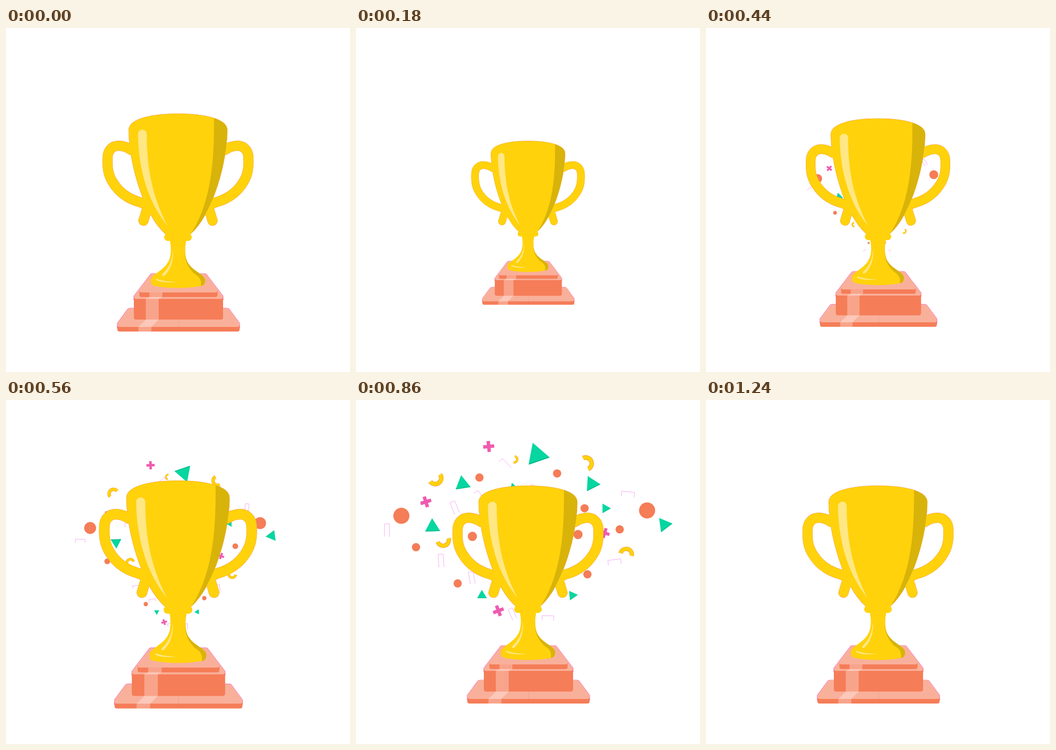
An HTML page for the animation above (1500 ms loop, 748x748 px).

```html
<!DOCTYPE html>
<html lang="en">
<head>
<meta charset="utf-8">
<title>Trophy</title>
<style>
  html, body { margin: 0; width: 100%; height: 100%; overflow: hidden; background: #fff; }
  svg { display: block; width: 100vw; height: 100vh; }
  .gold { fill: #ffd20c; }
  .shade { fill: #d8b30a; }
  .glow { fill: #ffe785; }
  .top { fill: #f9b09a; stroke: #ff4fd0; stroke-width: 1.2; paint-order: stroke; }
  .front { fill: #f57d58; }
  .rim { fill: #f5893f; stroke: #f5893f; stroke-width: 1.1; }
  .handle { fill: none; stroke: #ffd20c; stroke-width: 21; stroke-linecap: round; }
  .edge { stroke: #f5893f; stroke-width: 22; }
  .slip { fill: none; stroke: #f08cf4; stroke-width: .8; }
</style>
</head>
<body>
<svg viewBox="0 0 748 748">
  <defs>
    <path id="cup" d="M267 222C267 196 322 186.500 374 186.500S481 196 481 222C481 290 450 404 401 448H347C298 404 267 290 267 222Z"/>
    <path id="stem" d="M356 460H392C388 480 388 502 398 514C409 530 433 536 433 549C433 553 432 557 428 560C400 567 348 567 320 560C315 557 315 553 315 549C315 537 337 530 349 514C360 500 360 480 356 460Z"/>
    <rect id="collar" x="344" y="447" width="60" height="16" rx="8"/>
    <path id="arm" d="M272 265C260 257 251 256 244 256C231 256 221 267 221 281C220 300 221 318 232 335C247 360 270 373 292 379C307 384 309 391 304 402L299 419"/>
    <clipPath id="inCup"><use href="#cup"/></clipPath>
    <clipPath id="inStem"><use href="#stem"/></clipPath>
  </defs>
  <g id="confetti"></g>
  <g id="trophy">
    <path class="top" d="M271 609H479Q484 609 486 612L508 642V652H242V642L264 612Q266 609 271 609Z"/>
    <path class="front" d="M242 645q0 5 5 5H503q5 0 5-5V655q0 5-5 5H247q-5 0-5-5Z"/>
    <path class="top" d="M318 534H432Q435 534 437 537L472 583V591H278V583L313 537Q315 534 318 534Z"/>
    <path class="front" d="M290 570q0 5 5 5H455q5 0 5-5V580q0 5-5 5H295q-5 0-5-5Z"/>
    <path class="front" d="M278 584q0 5 5 5H467q5 0 5-5V629q0 5-5 5H283q-5 0-5-5Z"/>
    <path d="M375.5 634V660" stroke="#e8704c" stroke-width=".6" opacity=".5"/>
    <path fill="#fff" opacity=".3" d="M312 575H340V585L332 589V634L316 650V660H288V650L304 634V589L312 585Z"/>

    <use href="#cup" class="rim"/>
    <use href="#arm" class="handle edge"/>
    <use href="#arm" class="handle edge" transform="matrix(-1 0 0 1 748 0)"/>
    <use href="#arm" class="handle"/>
    <use href="#arm" class="handle" transform="matrix(-1 0 0 1 748 0)"/>

    <use href="#stem" class="gold"/>
    <path class="shade" clip-path="url(#inStem)" d="M391 463C386 500 391 515 408 533C420 541 427 547 423 564H440V463Z"/>
    <path class="glow" d="M363 483C365 505 358 525 346 537C342 541 338 539 340 535C352 524 361 510 363 483Z"/>
    <path class="glow" d="M326 545C340 550 355 552 372 552C350 555 330 552 326 547Z"/>
    <use href="#collar" class="gold"/>
    <use href="#cup" class="gold"/>
    <path class="shade" clip-path="url(#inCup)" d="M452 180V190C454 300 443 385 401 449H490V180Z"/>
    <path class="glow" d="M287 231a9.500 9.500 0 0 1 19-1C306 310 320 370 351 430C310 380 288 310 287 231Z"/>
  </g>
</svg>
<script>
const LOOP = 1500, BURST = 250, LIFE = 830, SPREAD = 860;
const ORIGIN = { x: 372, y: 530 };
const layer = document.getElementById('confetti');
const trophy = document.getElementById('trophy');

const halfRing = (color, width) =>
  `<path d="M0-.75A.75 .75 0 0 1 0 .75" fill="none" stroke="${color}" stroke-width="${width}"/>`;

// A piece is turned by tilt + turn * direction, and spins in degrees per ms.
const kinds = {
  slip: { tilt: 40, turn: -1, spin: .3 },
  disc: { tilt: 0, turn: 0, spin: 0, art: '<circle r="1" fill="#f57d58"/>' },
  wedge: { tilt: 12, turn: -.4, spin: .6,
    art: '<path d="M1 0L-.5 .866V-.866Z" fill="#06d6a0"/><path d="M.95 0L-.46 .8" stroke="#08b98c" stroke-width=".08"/>' },
  cross: { tilt: 0, turn: .5, spin: .29,
    art: '<path d="M-1 0H1M0-1V1" stroke="#ef5bb0" stroke-width=".62"/>' },
  ring: { tilt: 5, turn: -1.7, spin: .61, art: halfRing('#f0923a', .56) + halfRing('#ffd20c', .46) }
};

const clamp = v => Math.min(1, Math.max(0, v));
const swing = p => (1 - Math.cos(Math.PI * p)) / 2;
const rad = deg => deg * Math.PI / 180;

// Drag slows the sideways flight gently and the climb sharply.
const slow = power => age => 1 - (1 - clamp(age / LIFE)) ** power;
const drift = slow(2.3), climb = slow(5);
const grow = age => drift(age) ** .8;

const pieces = [];

// Throws pieces of one kind to a shared radius, one per direction (0 is up).
function toss(name, size, radius, ...directions) {
  const kind = kinds[name];
  const delay = Math.min(155, Math.max(0, (350 - radius) * 1.6));
  const start = BURST + delay, full = SPREAD - start;
  for (const dir of directions) {
    const el = document.createElementNS('http://www.w3.org/2000/svg', kind.art ? 'g' : 'path');
    if (kind.art) el.innerHTML = kind.art;
    else el.setAttribute('class', name);
    layer.append(el);
    pieces.push({
      el, kind, start,
      angle: kind.tilt + kind.turn * dir,
      dx: radius * Math.sin(rad(dir)) / drift(full),
      dy: -radius * Math.cos(rad(dir)) / climb(full),
      size: size / grow(full)
    });
  }
}

toss('slip', 1, 392, -51, -7, 34);
toss('slip', 1, 335, -28, -18, 3);
toss('slip', 1, 260, -46, 47);
toss('slip', .95, 187, -40);
toss('slip', .9, 72, -26, 39);
toss('disc', 17.5, 390, -44.5, 42);
toss('disc', 9, 376, -16, 10);
toss('disc', 9, 320, -49, 23, 39);
toss('disc', 10, 262, -27, 25);
toss('disc', 9, 200, -49, 41);
toss('wedge', 28, 411, 3);
toss('wedge', 19, 375, -22, 22);
toss('wedge', 18, 395, 49);
toss('wedge', 19, 327, -39);
toss('wedge', 12, 340, -5, 30);
toss('wedge', 12, 144, -43, 43);
toss('cross', 12, 437, -11);
toss('cross', 12, 379, -35.5);
toss('cross', 11, 294, 35);
toss('cross', 12, 95, -41);
toss('ring', 17.5, 412, -29, 18);
toss('ring', 9, 402, -4);
toss('ring', 16.5, 290, -39, 48);

// Sides of a paper slip that face up or sideways
function slipPath(x, y, s, deg) {
  const c = Math.cos(rad(deg)), n = Math.sin(rad(deg));
  const pts = [[-14, -5.5], [14, -5.5], [14, 5.5], [-14, 5.5]]
    .map(([u, v]) => [x + s * (u * c - v * n), y + s * (u * n + v * c)]);
  const downs = [-c, n, c, -n];
  return pts.map((p, i) => downs[i] < .5 ? `M${p}L${pts[(i + 1) % 4]}` : '').join('');
}

function placePiece(o, t) {
  const age = t - o.start;
  const s = o.size * grow(age) * (1 - swing(clamp((age - 640) / 180)));
  const shown = age > 0 && s > .01;
  o.el.style.display = shown ? '' : 'none';
  if (!shown) return;
  const x = ORIGIN.x + o.dx * drift(age);
  const y = ORIGIN.y + o.dy * climb(age);
  const a = o.angle + o.kind.spin * (t - SPREAD);
  if (o.kind.art) o.el.setAttribute('transform', `translate(${x} ${y}) rotate(${a}) scale(${s})`);
  else o.el.setAttribute('d', slipPath(x, y, s, a));
}

// The cup bounces between these sizes, one swing per beat.
const BEAT = 146, sizes = [1, .7, 1.105, .956, 1.052, 1];
function bounce(t) {
  const i = Math.floor(t / BEAT);
  if (i >= sizes.length - 1) return 1;
  return sizes[i] + (sizes[i + 1] - sizes[i]) * swing(t / BEAT - i);
}

function draw(t) {
  trophy.setAttribute('transform', `translate(374 425) scale(${bounce(t)}) translate(-374 -425)`);
  pieces.forEach(o => placePiece(o, t));
}

let begin;
function tick(now) {
  begin ??= now;
  draw((now - begin) % LOOP);
  requestAnimationFrame(tick);
}
draw(0);
requestAnimationFrame(tick);
</script>
</body>
</html>
```
